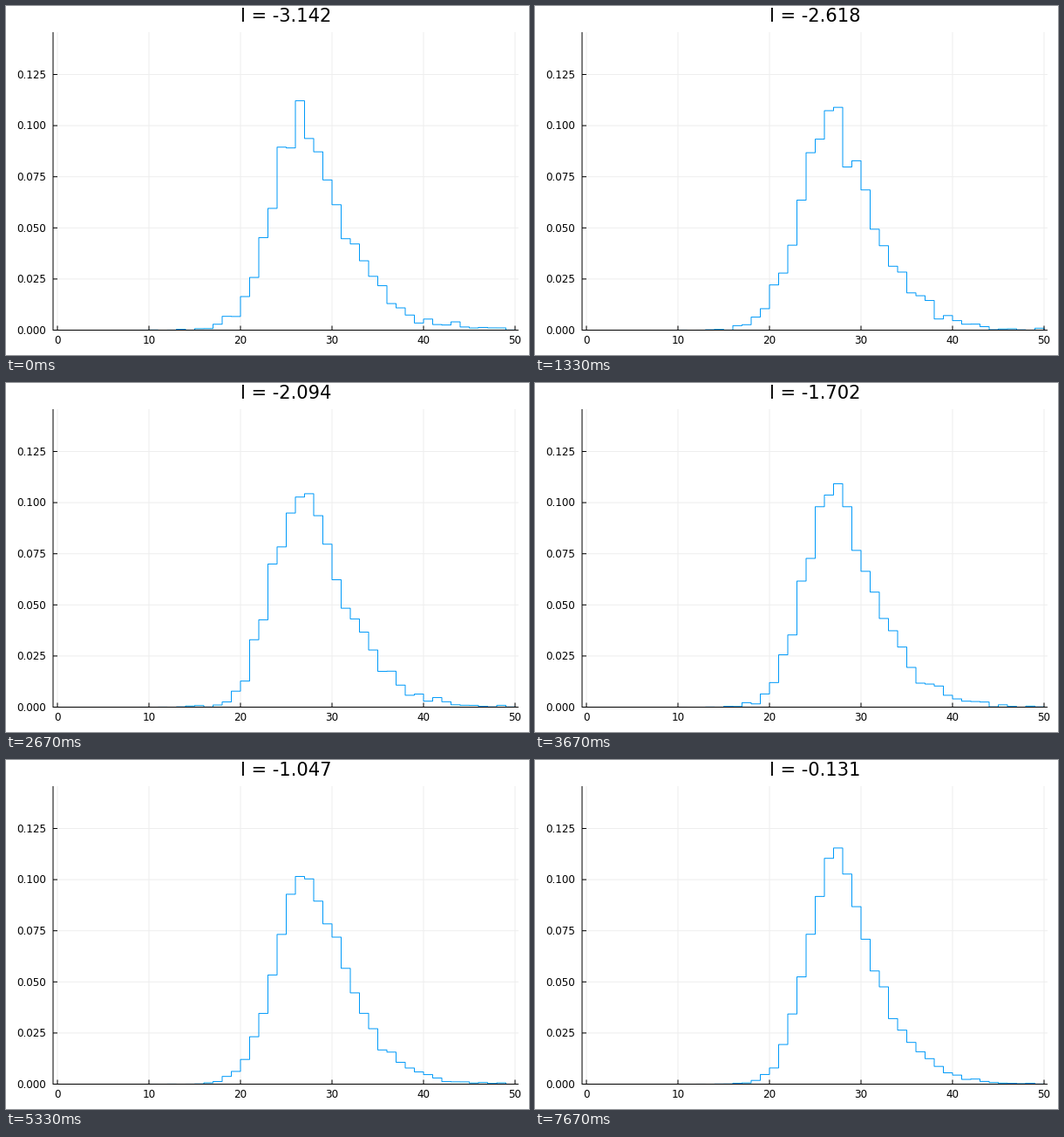
These frames come from a looping animation (600x400 px, 8000 ms). A matplotlib script:

```python
import math

import matplotlib.pyplot as plt
import numpy as np
from matplotlib.animation import FuncAnimation

STEPS, FRAMES, LOOP_MS = 24, 400, 8000
PX = 0.72                          # points per pixel at 100 dpi
LEFT, RIGHT, TOP, BASE = 54, 588, 30, 371.5
X0, BIN_W, Y_SCALE = 59, 10.5, 2344
BLUE = "#009af9"
BINS = np.arange(50)

plt.rcParams["font.family"] = "DejaVu Sans"
plt.rcParams["path.snap"] = False


def density(step):
    """Skewed bell that sharpens while its sampling noise fades."""
    t = step / (STEPS - 1)
    offset = (BINS - 26.4 - 0.6 * t) / (1.04 - 0.11 * t)
    left = np.exp(-(offset / 4.8) ** 2)
    right = np.exp(-(np.abs(offset) / 5.78) ** 1.36)
    bell = np.where(offset < 0, left, right)
    bell /= bell.sum()
    noise = np.random.default_rng(100 + step).normal(size=BINS.size)
    spread = 0.07 - 0.045 * t
    return np.maximum(bell + spread * np.sqrt(0.1 * bell) * noise, 0)


def to_y(value):
    return BASE - Y_SCALE * value


fig = plt.figure(figsize=(6, 4), dpi=100, facecolor="white")
ax = fig.add_axes([0, 0, 1, 1])
ax.set(xlim=(0, 600), ylim=(400, 0))
ax.axis("off")


def segment(xs, ys, **style):
    ax.plot(xs, ys, **{"color": "black", "lw": PX, "zorder": 4,
                       "solid_capstyle": "butt", **style})


GRID = {"color": "#eeeeee", "zorder": 1}
for n in range(0, 51, 10):
    x = X0 + BIN_W * n
    segment([x, x], [TOP, BASE], **GRID)
    segment([x, x], [BASE, BASE - 5])
    ax.text(x, 387, str(n), size=12 * PX, ha="center", va="baseline")
for k in range(6):
    y = to_y(0.025 * k)
    segment([LEFT, RIGHT], [y, y], **GRID)
    segment([LEFT, LEFT + 5], [y, y])
    ax.text(46.3, y + 4.3, f"{0.025 * k:.3f}", size=12 * PX,
            ha="right", va="baseline")
segment([LEFT, LEFT], [TOP, BASE + 0.5])
segment([LEFT, RIGHT], [BASE, BASE])

title = ax.text(321, 18, "", size=21 * PX, ha="center", va="baseline")
curve, = ax.plot([], [], color=BLUE, lw=PX, zorder=3,
                 solid_joinstyle="miter")
EDGES = X0 + BIN_W * np.repeat(np.arange(51), 2)


def update(i):
    # Each step starts on the last tick at or before its due time
    step = (3 * i + 2) * STEPS // (3 * FRAMES)
    heights = np.repeat(density(step), 2)
    curve.set_data(EDGES, to_y(np.concatenate([[0], heights, [0]])))
    title.set_text(f"l = {round(-math.pi + step * math.pi / STEPS, 3)}")
    return curve, title


anim = FuncAnimation(fig, update, frames=FRAMES, interval=LOOP_MS / FRAMES,
                     repeat=True, repeat_delay=0)
plt.show()
```
